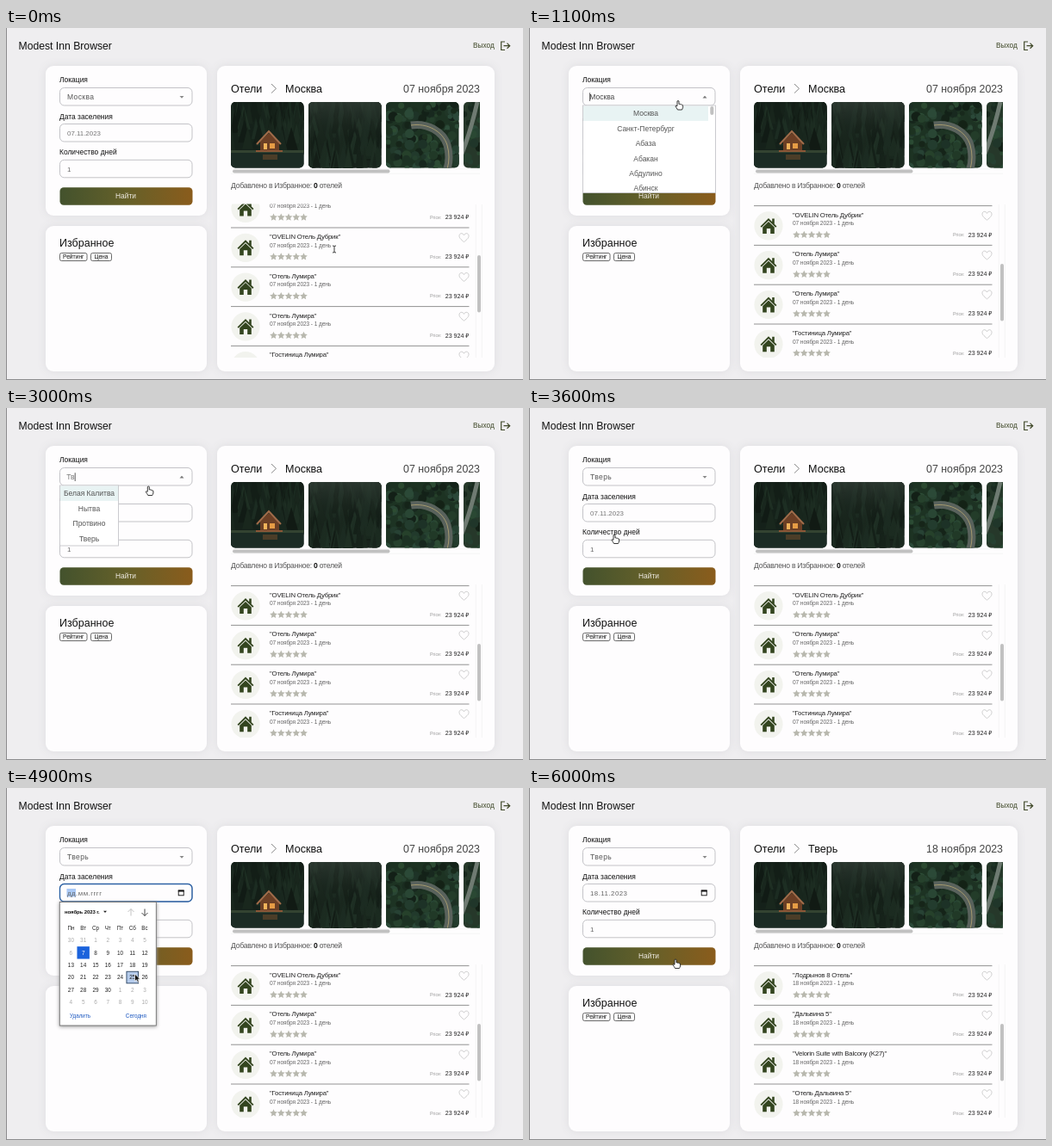
An HTML page that plays this animation: 600 px wide and 409 px high, repeating every 6.1 s.

```html
<!DOCTYPE html>
<html lang="ru">
<head>
<meta charset="utf-8">
<style>
html, body { margin: 0; width: 100%; height: 100%; overflow: hidden; background: #efeef0; }
svg { display: block; width: 600px; height: 409px; font-family: "Liberation Sans", Arial, sans-serif; }
text { white-space: pre; }
.panel { fill: #fefdfe; filter: drop-shadow(0 0 5px #dddce0); }
</style>
</head>
<body>
<svg id="stage" viewBox="0 0 600 409">
  <defs>
    <linearGradient id="btn"><stop stop-color="#43522d"/><stop offset=".5" stop-color="#656029"/><stop offset="1" stop-color="#8a5c1c"/></linearGradient>
    <linearGradient id="mist" x2="0" y2="1"><stop stop-color="#3b463f" stop-opacity=".55"/><stop offset=".6" stop-color="#18231c" stop-opacity=".1"/></linearGradient>
    <clipPath id="gallery"><rect x="261" y="86" width="289" height="77"/></clipPath>
    <clipPath id="card"><rect width="84.5" height="76.5" rx="5"/></clipPath>
    <clipPath id="list"><rect x="261" y="204.5" width="284" height="178.5"/></clipPath>
    <clipPath id="menu"><rect x="62" y="90" width="155" height="101"/></clipPath>
    <g id="house" fill="#33451f"><path d="M-9.5 .5L0-9L9.5 .5L8.2 1.8L0-6.2L-8.2 1.8ZM4.2-8.5H6.8V-2H4.2ZM0-5L6.8 1.5V9H2.2V3H-2.2V9H-6.8V1.5Z"/></g>
    <path id="star" fill="#b8b8ae"/>
    <path id="heart" d="M0 5C-4 1.8-5.5.2-5.5-2C-5.5-5.4-1.4-6 0-2.8C1.4-6 5.5-5.4 5.5-2C5.5.2 4 1.8 0 5Z" fill="none" stroke="#c3c3c3" stroke-width=".8"/>
    <path id="arrow" d="M0 0V8.5L2 6.8L3.3 9.7L4.8 9L3.5 6.2H6.2Z" fill="#111" stroke="#fff" stroke-width=".7"/>
    <path id="hand" d="M-1-1.5Q0-2.5 1-1.5V2Q2 1.3 2.7 2.3Q3.8 1.7 4.3 2.8Q5.6 2.5 5.6 4V6Q5 7.5 4.5 8.5H-.5Q-1.5 6.5-3 4.6Q-3.3 3.2-1 4.2Z" fill="#fff" stroke="#222" stroke-width=".9"/>
    <path id="ibeam" d="M-2-4Q0-4 0-3Q0-4 2-4M0-3V3M-2 4Q0 4 0 3Q0 4 2 4" fill="none" stroke="#222" stroke-width=".9"/>
  </defs>
  <g id="base"></g>
  <g id="live"></g>
</svg>
<script>
const LOOP = 6100, STEP = 100;
const OPEN = 900, TYPE_1 = 1900, TYPE_2 = 2500, PICK_CITY = 3600,
      FOCUS = 4200, CALENDAR = 4500, PICK_DAY = 5300, SEARCH = 5800;
const $ = id => document.getElementById(id);

const text = (x, y, str, size, fill = "#111", extra = "") =>
  `<text x="${x}" y="${y}" font-size="${size}" fill="${fill}" ${extra}>${str}</text>`;
const rect = (x, y, w, h, fill, extra = "") =>
  `<rect x="${x}" y="${y}" width="${w}" height="${h}" fill="${fill}" ${extra}/>`;
const path = (d, stroke, width = 1, fill = "none") =>
  `<path d="${d}" stroke="${stroke}" stroke-width="${width}" fill="${fill}"/>`;
const use = (id, x, y) => `<use href="#${id}" x="${x}" y="${y}"/>`;
const MID = 'text-anchor="middle"', END = 'text-anchor="end"';
const field = y => rect(62.5, y, 153.5, 20.5, "#fefdfe", 'rx="5" stroke="#c3c3c7"');

let seed = 7;
const rand = () => (seed = seed * 16807 % 2147483647) / 2147483647;

function forest(count, top, bottom, hue, light) {
  let out = "";
  for (let i = 0; i < count; i++) {
    const x = rand() * 90 - 3, y = top + (bottom - top) * i / count, h = 22 + rand() * 20, w = 4 + rand() * 4;
    out += `<path d="M${x} ${y}L${x + w} ${y + h}H${x - w}Z" fill="hsl(${hue} 22% ${light + rand() * 7}%)"/>`;
  }
  return out;
}

function leaves(count) {
  let out = "";
  for (let i = 0; i < count; i++)
    out += `<circle cx="${rand() * 86}" cy="${rand() * 78}" r="${2 + rand() * 4}" fill="hsl(${130 + rand() * 20} 26% ${10 + rand() * 14}%)"/>`;
  return out;
}

const road = path("M29 27C48 24 66 34 71 50Q75 64 71 78", "#59625c", 9) +
  path("M29 27C48 24 66 34 71 50Q75 64 71 78", "#b8a873", .8);
const cabin = rect(0, 58, 85, 19, "#1b2b24") + rect(0, 56, 85, 3, "#334331") +
  path("M34 56V46L44 36L56 47V56Z", "none", 0, "#6c3f25") +
  path("M30 49L44 34L58 49", "#a06b49", 2) +
  rect(38, 48, 4, 7, "#f0b35a") + rect(45, 48, 6, 6, "#e69b45") +
  rect(29, 56, 31, 2, "#8b5737") + rect(37, 61, 17, 6, "#6b4a2c", 'opacity=".6"');

const photo = (x, fill, body) =>
  `<g transform="translate(${x} 86)" clip-path="url(#card)">${rect(0, 0, 85, 77, fill)}${body}</g>`;

function drawBase() {
  let d = "";
  for (let i = 0; i < 10; i++) {
    const r = i % 2 ? 2.2 : 4.6, a = i * Math.PI / 5;
    d += (i ? "L" : "M") + (r * Math.sin(a)).toFixed(2) + " " + (-r * Math.cos(a)).toFixed(2);
  }
  $("star").setAttribute("d", d + "Z");

  const panel = (x, y, w, h) => rect(x, y, w, h, "#fefdfe", 'rx="9" class="panel"');
  const tag = (x, w, str) => rect(x, 261.5, w, 9, "#fff", 'rx="2" stroke="#444" stroke-width=".8"') +
    text(x + w / 2, 268.4, str, 6.7, "#111", MID);

  $("base").innerHTML = rect(0, 0, 600, 409, "#efeef0") +
    rect(0, 0, 1, 409, "#8b8b8d") + rect(0, 408, 600, 1, "#8b8b8d") +
    text(14.5, 24.5, "Modest Inn Browser", 12.2) +
    text(542, 22.5, "Выход", 8.3, "#3f4828") +
    path("M579 16H574.7V25.5H579M577.5 20.7H584.5M581.5 17.6L584.7 20.7L581.5 23.8", "#3f4828", 1.2) +
    panel(46, 44, 187, 174) + panel(46, 230, 187, 169) + panel(245, 44, 322, 355) +
    text(62, 63.4, "Локация", 8.45) + text(62, 105.5, "Дата заселения", 8.45) +
    text(62, 147.3, "Количество дней", 8.45) +
    field(69.5) + field(111.5) + field(153.3) + text(71, 166.7, "1", 8, "#666") +
    rect(62.5, 185.3, 154, 20.5, "url(#btn)", 'rx="4.5"') + text(139, 198.3, "Найти", 8.4, "#eeeae2", MID) +
    text(62, 254.3, "Избранное", 12.5) + tag(62.5, 31.5, "Рейтинг") + tag(98.5, 24, "Цена") +
    text(261, 74.6, "Отели", 12.6) + path("M308 65L313.5 70.3L308 75.6", "#888", 1) +
    `<g clip-path="url(#gallery)">` +
    photo(261, "#15211a", forest(90, -18, 30, 140, 8) + cabin) +
    photo(351, "#18231c", forest(110, -20, 60, 140, 9) + rect(0, 0, 85, 77, "url(#mist)")) +
    photo(441, "#1d3323", leaves(170) + road) +
    photo(531, "#26382a", leaves(90) + path("M-2 60Q8 35 16 0", "#6f7b72", 5)) + `</g>` +
    path("M261 163.8H550M261 169.2H550", "#eeeeee", .6) +
    rect(263, 164.6, 182.5, 3.9, "#c1c1c1", 'rx="2"') +
    `<g letter-spacing="-.24">${text(261, 185.5, 'Добавлено в Избранное: <tspan font-weight="bold" fill="#111">0</tspan> отелей', 8.6, "#555")}</g>` +
    path("M545.3 205V383M552.3 205V383", "#eeeeee", .6);
}

const ease = u => u * u * (3 - 2 * u);
// Interpolates rows of [time, ...values].
function track(keys, t) {
  let i = 0;
  while (i < keys.length - 2 && t >= keys[i + 1][0]) i++;
  const a = keys[i], b = keys[i + 1];
  const u = ease(Math.min(1, Math.max(0, (t - a[0]) / (b[0] - a[0]))));
  return a.slice(1).map((v, k) => v + (b[k + 1] - v) * u);
}

const scrollKeys = [[0, 0], [500, 25.4]];
const pointerKeys = [[0, 381, 257], [400, 381, 257], [800, 173, 86.5], [2900, 173, 86.5], [3400, 99, 149],
  [3700, 99, 149], [4100, 198, 123], [4500, 198, 123], [4900, 149.5, 216], [5100, 148, 205],
  [5300, 148, 205], [5600, 170, 201], [LOOP, 170, 201]];

const hotels = {
  before: ["Отель Лумира", "OVELIN Отель Дубрик", "Отель Лумира", "Отель Лумира", "Гостиница Лумира"],
  after: ["Отель Лумира", "Лодрынов 8 Отель", "Дальвина 5", "Velorin Suite with Balcony (K27)", "Отель Дальвина 5"]
};

function drawHotels(t) {
  const [scroll] = track(scrollKeys, t), found = t >= SEARCH;
  const date = (found ? "18" : "07") + " ноября 2023";
  let out = text(324, 74.6, found ? "Тверь" : "Москва", 12.6) + text(550, 74.6, date, 12.35, "#444", END) +
    `<g clip-path="url(#list)">`;
  hotels[found ? "after" : "before"].forEach((name, i) => {
    const y = 186.2 + 45.8 * i - scroll;
    out += path(`M261 ${y}H537.5`, "#777", .8) +
      `<circle cx="278" cy="${y + 23.3}" r="16.6" fill="#f2f3ee"/>` + use("house", 278, y + 23.3) +
      text(306, y + 12.9, `"${name}"`, 7.75, "#222", 'letter-spacing="-.2"') +
      text(306, y + 22.6, date + " - 1 день", 6.6, "#666", 'letter-spacing="-.1"');
    for (let s = 0; s < 5; s++) out += use("star", 310.5 + 8.75 * s, y + 33.8);
    out += use("heart", 531.5, y + 11.6) + text(492, y + 35.6, "Price:", 5.3, "#999") +
      text(537.5, y + 35.9, "23 924 ₽", 7.1, "#222", END);
  });
  return out + "</g>" + rect(547, 264 + scroll * .39, 4, 66.5, "#c1c1c1", 'rx="2"');
}

const menus = [
  ["Москва", "Санкт-Петербург", "Абаза", "Абакан", "Абдулино", "Абинск"],
  ["Санкт-Петербург", "Алатырь", "Алушта", "Альметьевск", "Апатиты", "Ардатов"],
  ["Белая Калитва", "Нытва", "Протвино", "Тверь"]
];

function drawSelect(t, pointerY) {
  const open = t >= OPEN && t < PICK_CITY;
  const caret = x => t % 1000 < 500 ? path(`M${x} 75.3V85`, "#333", .8) : "";
  let out = open ? path("M201.5 81.5H206.5L204 78.8Z", "none", 0, "#777")
                 : path("M201.5 79H206.5L204 81.7Z", "none", 0, "#888");
  if (!open) return out + text(71, 83.2, t < OPEN ? "Москва" : "Тверь", 8.5, "#555", 'letter-spacing=".4"');

  const stage = t < TYPE_1 ? 0 : t < TYPE_2 ? 1 : 2, narrow = stage === 2;
  out += text(70.3, 83.2, ["Москва", "Т", "Тв"][stage], 8.5, stage ? "#777" : "#444") + caret([70.6, 75.6, 80.2][stage]);
  const width = narrow ? 68 : 154, height = narrow ? 70 : 101.5, inner = narrow ? 68 : 146;
  const hover = narrow && t > 3000 ? Math.max(0, Math.min(3, Math.floor((pointerY - 91) / 17.4))) : 0;
  out += rect(62.5, 90, width, height, "#fff", 'stroke="#c6c6ca" stroke-width=".9"') + `<g clip-path="url(#menu)">` +
    rect(63, 90.7 + 17.4 * hover, inner - 1, 17.2, "#e8f3f3");
  menus[stage].forEach((city, i) => out += text(62.5 + inner / 2, 102.3 + 17.4 * i, city, 8.5, "#555", MID));
  out += "</g>";
  return narrow ? out : out + rect(210.3, 91, 4, 10, "#c1c1c1", 'rx="2"');
}

function drawDate(t) {
  if (t < FOCUS) return text(71, 124.5, "07.11.2023", 7.9, "#777");
  const picked = t >= PICK_DAY, wide = 'letter-spacing=".45"';
  let out = "";
  if (t < 5500) out += rect(62.5, 111.5, 153.5, 20.5, "none", 'rx="5" stroke="#2d62a5" stroke-width="1.4"');
  if (!picked) out += rect(70.5, 117, 10.5, 9.5, "#a9c8f5");
  return out + text(71, 124.5, picked ? "18.11.2023" : "дд.мм.гггг", 7.9, "#666", wide) +
    rect(200.2, 119.2, 6, 5.6, "none", 'stroke="#111" stroke-width=".9"') + rect(199.8, 118.5, 6.8, 2, "#111");
}

function drawCalendar(x, y) {
  const col = i => 75.4 + 14.27 * i, row = i => 177 + 14.35 * i;
  let out = rect(62.3, 132.5, 112, 143.5, "#fff", 'stroke="#707070" stroke-width=".9" style="filter:drop-shadow(0 1px 2px #999)"') +
    text(68, 145.9, "ноябрь 2023 г.", 6, "#111", 'font-weight="bold" letter-spacing="-.1"') +
    path("M113 142.7H117L115 145Z", "none", 0, "#222") +
    path("M145 148.5V140.5M141.5 144L145 140.5L148.5 144", "#bbb", .9) +
    path("M161 140.5V148.5M157.5 145L161 148.5L164.5 145", "#333", .9);
  ["Пн", "Вт", "Ср", "Чт", "Пт", "Сб", "Вс"].forEach((d, i) => out += text(col(i), 164.7, d, 6.3, "#222", MID));
  const hoverCol = Math.round((x - 75.4) / 14.27), hoverRow = Math.round((y + 2 - 177) / 14.35);
  for (let i = 0; i < 42; i++) {
    const n = i - 1, c = i % 7, r = Math.floor(i / 7), inside = n >= 1 && n <= 30;
    const day = n < 1 ? n + 31 : n > 30 ? n - 30 : n;
    const today = n === 7, hover = c === hoverCol && r === hoverRow;
    if (today) out += rect(col(c) - 7.2, row(r) - 7.2, 14.4, 14.4, "#1a62dc");
    else if (hover) out += rect(col(c) - 6.8, row(r) - 6.8, 13.6, 13.6, "#b5cbeb", 'stroke="#27405f" stroke-width=".9"');
    out += text(col(c), row(r) + 2.3, day, 6.4, today ? "#fff" : !inside || n < 7 ? "#aaa" : "#222", MID);
  }
  return out + text(74, 267, "Удалить", 6.3, "#1c58c0") + text(163, 267, "Сегодня", 6.3, "#1c58c0", END);
}

function pointerShape(t) {
  if (t < 500) return "ibeam";
  if (t >= 1800 && t < 3000) return "";
  if (t < 700 || t >= 3800 && t < 5500) return "arrow";
  return "hand";
}

function draw(t) {
  const [x, y] = track(pointerKeys, t), shape = pointerShape(t);
  $("live").innerHTML = drawHotels(t) + drawDate(t) + drawSelect(t, y) +
    (t >= CALENDAR && t < PICK_DAY ? drawCalendar(x, y) : "") + (shape && use(shape, x, y));
}

drawBase();
let last = -1;
function tick() {
  const t = Math.floor(performance.now() % LOOP / STEP) * STEP;
  if (t !== last) draw(last = t);
  requestAnimationFrame(tick);
}
tick();
</script>
</body>
</html>
```
